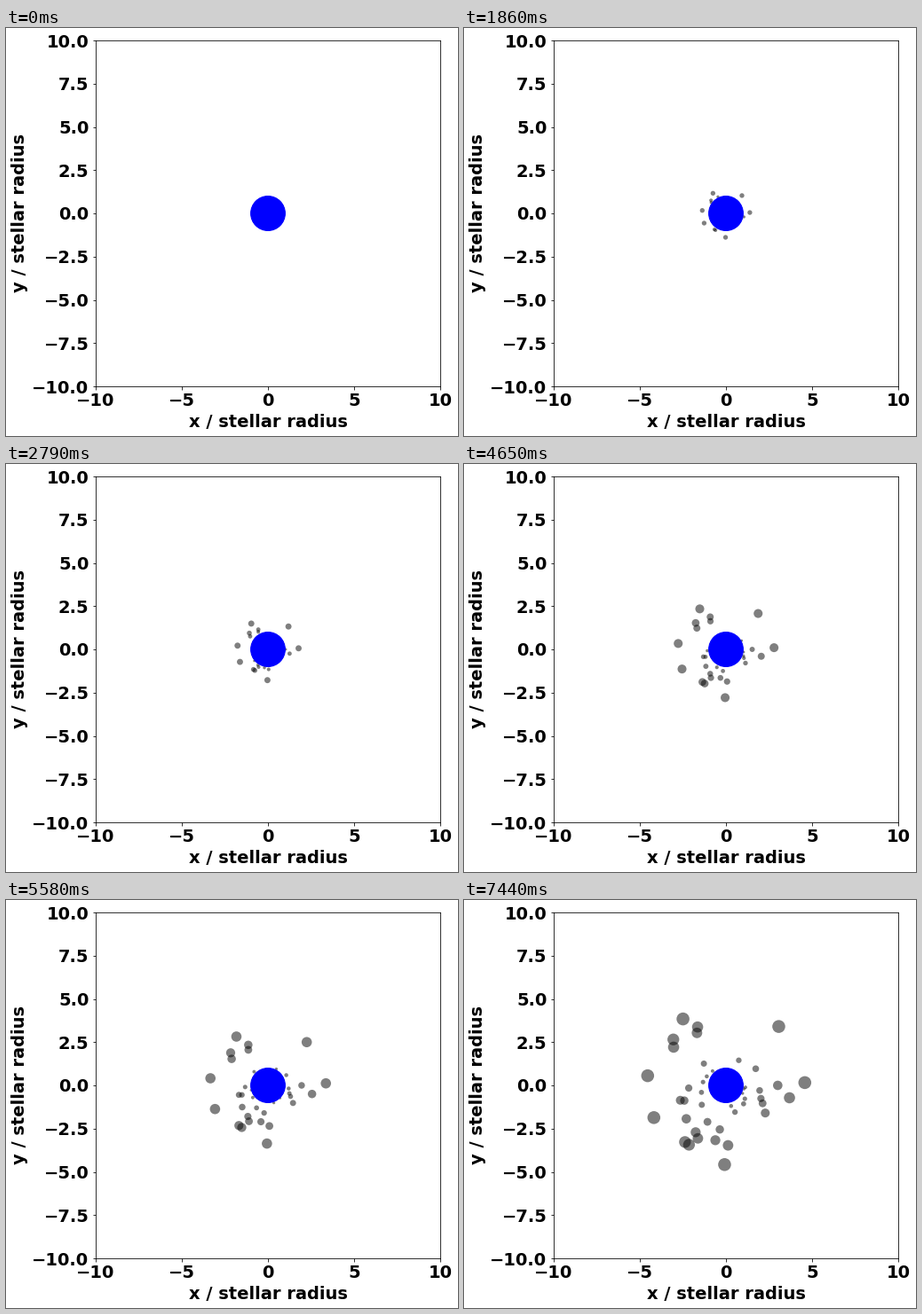
A matplotlib script that plays this animation: 509 px wide and 460 px high, repeating every 8000 ms.

```python
import matplotlib.pyplot as plt
import numpy as np
from matplotlib.animation import FuncAnimation

WIDTH, HEIGHT, DPI = 509, 460, 64
PT = 72 / DPI                 # points per pixel
LOOP, TICK, HOLD = 8000, 40, 930
LAST = LOOP // HOLD           # index of the last step
V_INF, BETA = 0.725, 0.6      # wind law, in stellar radii per step
R_LAST = 4.58                 # radius of the first clumps at the last step

plt.rcParams.update({
    "font.family": "DejaVu Sans",
    "font.weight": "bold",
    "font.size": 14 * 100 / DPI,
    "axes.labelweight": "bold",
})


def speed(r):
    return (1 - 1 / r) ** BETA


# Travel time along the wind, shifted so that launch is at time 0
radii = np.linspace(1.0005, 6, 20000)
times = np.cumsum((radii[1] - radii[0]) / (V_INF * speed(radii)))
times += LAST - np.interp(R_LAST, radii, times)

# A burst of six, three groups of three, then a steady stream of pairs
launch = np.concatenate([
    np.zeros(6),
    np.repeat(0.86 + 0.48 * np.arange(3), 3),
    np.repeat(2.23 + 0.39 * np.arange(14), 2),
])

# The early, large clumps have chosen directions; the rest are random
early = [2, 48, 123, 173, 204, 269, 139, 234, 238, 116, 144, 349, 119,
         242, 272, 259, 237, 220, 0, 198, 325, 200, 262, 243, 334]
rng = np.random.default_rng(4)
late = rng.uniform(0, 360, len(launch) - len(early))
angles = np.radians(np.concatenate([early, late]))
directions = np.column_stack([np.cos(angles), np.sin(angles)])


def clumps_at(step):
    """Positions and marker areas of the clumps that have left the star."""
    r = np.interp(step - launch, times, radii, left=1)
    out = r > 1.02
    r = r[out]
    size = 2.77 * np.cbrt(r**2 * speed(r))
    return directions[out] * r[:, None], (2 * size * PT) ** 2


fig = plt.figure(figsize=(WIDTH / DPI, HEIGHT / DPI), dpi=DPI, facecolor="white")
ax = fig.add_axes([101 / WIDTH, 56 / HEIGHT, 388 / WIDTH, 390 / HEIGHT])
ax.set(xlim=(-10, 10), ylim=(-10, 10),
       xticks=np.arange(-10, 11, 5), yticks=np.arange(-10, 10.1, 2.5))
ax.tick_params(length=3.5 * PT, width=0.8 * PT, pad=4 * PT)
for spine in ax.spines.values():
    spine.set_linewidth(0.8 * PT)
ax.set_xlabel("x / stellar radius", labelpad=5 * PT)
ax.set_ylabel("y / stellar radius", labelpad=4 * PT)

wind = ax.scatter([], [], color="black", alpha=0.5, linewidths=0, zorder=2)
ax.add_patch(plt.Circle((0, 0), 1, color="blue", linewidth=PT, zorder=3))


def update(frame):
    step = ((frame + 1) * TICK - 1) // HOLD
    points, areas = clumps_at(step)
    wind.set_offsets(points)
    wind.set_sizes(areas)
    return wind,


anim = FuncAnimation(fig, update, frames=LOOP // TICK, interval=TICK,
                     repeat=True, repeat_delay=0)
plt.show()
```
